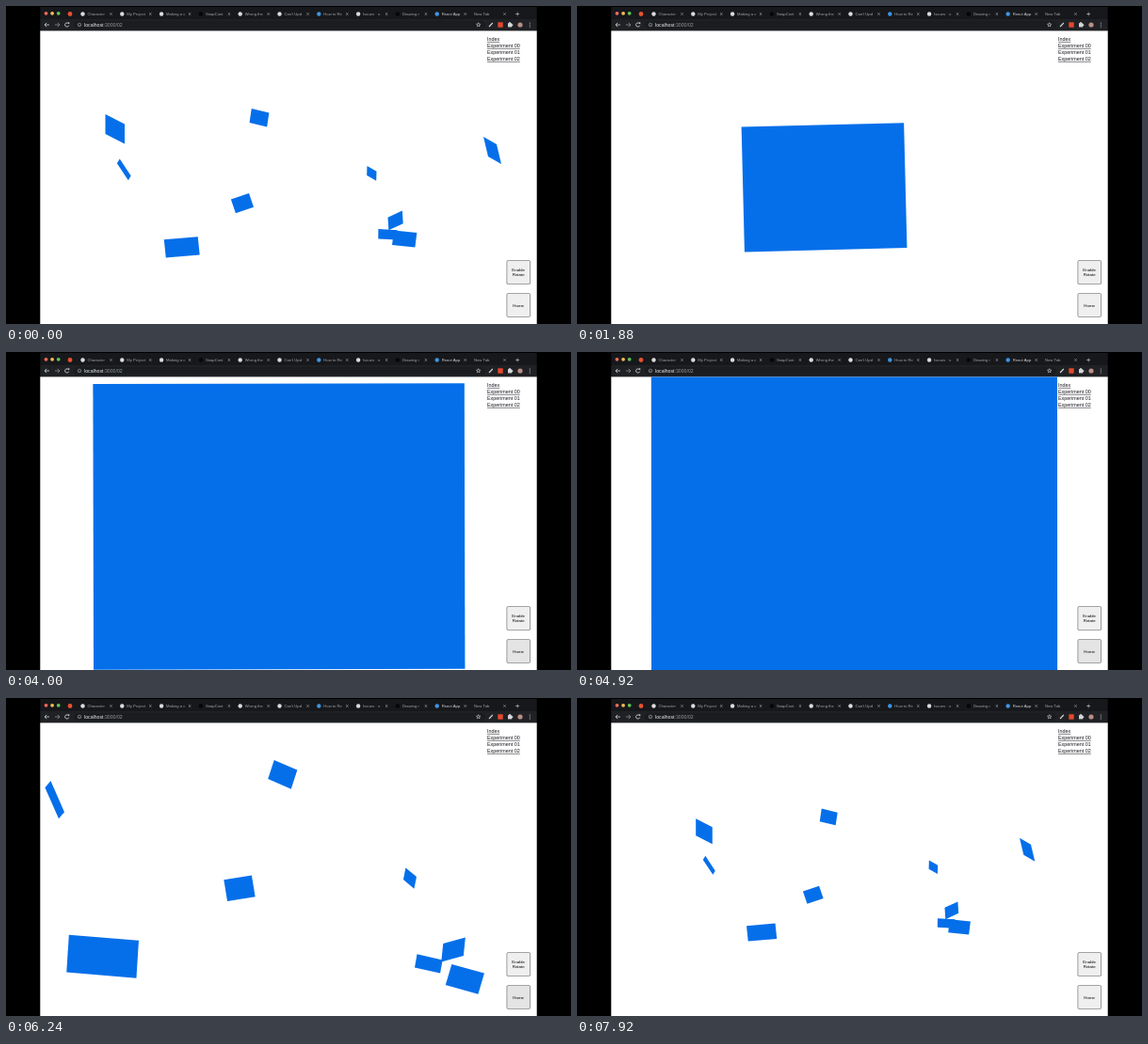
These frames come from a looping animation (600 by 338 pixels, 8000 ms). An HTML page with a canvas:

```html
<!DOCTYPE html>
<html lang="en">
<head>
<meta charset="utf-8">
<title>Experiment 02</title>
<style>
  html, body { margin: 0; width: 100%; height: 100%; overflow: hidden; background: #000; }
  canvas { display: block; width: 600px; height: 338px; }
</style>
</head>
<body>
<canvas id="stage"></canvas>
<script>
const W = 600, H = 338, LOOP = 8000, STEP = 40;
const VIEW = { x: 36.3, y: 26.4, w: 527.4, h: 311.6 };
const CX = 300, CY = 183.2;
const BLUE = '#056fea';
const FONT = '"Liberation Sans", Arial, sans-serif';

const canvas = document.getElementById('stage');
const ctx = canvas.getContext('2d');
const ratio = window.devicePixelRatio || 1;
canvas.width = W * ratio;
canvas.height = H * ratio;

// --- camera ---------------------------------------------------------------

const NEAR = 2.23, START = 49.5, HOME = 63.5;
const HOP_START = 1280, HOP = 280, RETURN = 5480;

// Smooth approach, then regular hops that each close 30% of the gap, then the way home
function distance(t) {
  if (t >= RETURN) return HOME - (HOME - 9.9) * Math.exp((RETURN - t) / 1320);
  const gap = (START - NEAR) * Math.exp(-Math.min(t, 1080) / 705);
  if (t < HOP_START) return NEAR + gap;
  const n = Math.floor((t - HOP_START) / HOP);
  const part = Math.min(1, ((t - HOP_START) % HOP + STEP) / (2 * STEP));
  return NEAR + gap * 0.704 ** (n + part);
}

// The camera turns evenly on the way in and lags at first on the way out
function makeCamera(d, leaving) {
  const far = d - NEAR;
  const roll = far * (leaving ? 0.215 + 0.0027 * far : 0.4) * Math.PI / 180;
  return { d, cos: Math.cos(roll), sin: Math.sin(roll), vx: -59.5 + 0.04 * d, vy: 14.5 - 0.095 * d };
}

function project(cam, p) {
  const depth = cam.d + p.z;
  const x = cam.vx + p.x / depth, y = cam.vy + p.y / depth;
  return [CX + x * cam.cos + y * cam.sin, CY - x * cam.sin + y * cam.cos];
}

function unproject(cam, sx, sy, z) {
  const x = sx - CX, y = sy - CY, depth = cam.d + z;
  return {
    x: (x * cam.cos - y * cam.sin - cam.vx) * depth,
    y: (x * cam.sin + y * cam.cos - cam.vy) * depth,
    z
  };
}

// --- cards ----------------------------------------------------------------

// Depth and three corners as seen by a camera; the fourth corner follows
function card(cam, z, ...c) {
  const [a, b, e] = [0, 2, 4].map(i => unproject(cam, c[i], c[i + 1], z));
  return [a, b, e, { x: a.x + e.x - b.x, y: a.y + e.y - b.y, z }];
}

const mid = makeCamera(33.5, true), far = makeCamera(START, false);
const cards = [
  [[-1, -1], [1, -1], [1, 1], [-1, 1]].map(([x, y]) => ({ x: 500 * x + 125, y: 385 * y - 30.5, z: 0 })),
  card(mid, -18.2, 68.5, 251.5, 142, 257.5, 139.5, 297),
  card(mid, -9.2, 48.5, 89, 63, 122, 57, 129),
  card(mid, 7.3, 284.5, 66.5, 309, 77, 302.5, 97),
  card(mid, 22.5, 424, 180.5, 435.5, 190, 433, 202.5),
  card(mid, 3, 463.5, 260.5, 487, 254, 485, 273.5),
  card(mid, 10.3, 436, 272, 463, 278, 460.5, 292),
  card(mid, 1.4, 472.5, 282.5, 507, 292, 500.5, 314),
  card(far, -16.5, 105.5, 115, 126, 125.5, 126, 146.5),
  card(far, -16.3, 507, 139, 521, 147, 526, 168)
];

function drawCards(cam) {
  ctx.fillStyle = BLUE;
  for (const pts of cards) {
    if (cam.d + pts[0].z < 1.2) continue;
    ctx.beginPath();
    for (const p of pts) ctx.lineTo(...project(cam, p));
    ctx.fill();
  }
}

// --- drawing helpers --------------------------------------------------------

function rect(x, y, w, h, color) {
  ctx.fillStyle = color;
  ctx.fillRect(x, y, w, h);
}

function pill(x, y, w, h, r, color) {
  ctx.fillStyle = color;
  ctx.beginPath();
  ctx.roundRect(x, y, w, h, r);
  ctx.fill();
}

function dot(x, y, r, color) {
  ctx.fillStyle = color;
  ctx.beginPath();
  ctx.arc(x, y, r, 0, 7);
  ctx.fill();
}

function arc(x, y, r, from, to, color, width) {
  ctx.strokeStyle = color;
  ctx.lineWidth = width;
  ctx.beginPath();
  ctx.arc(x, y, r, from, to);
  ctx.stroke();
}

function line(color, width, ...pts) {
  ctx.strokeStyle = color;
  ctx.lineWidth = width;
  ctx.beginPath();
  for (let i = 0; i < pts.length; i += 2) ctx.lineTo(pts[i], pts[i + 1]);
  ctx.stroke();
}

function text(str, x, y, size, color, align = 'left') {
  ctx.font = `${size}px ${FONT}`;
  ctx.fillStyle = color;
  ctx.textAlign = align;
  ctx.fillText(str, x, y);
  return ctx.measureText(str).width;
}

// --- browser frame ----------------------------------------------------------

const LIGHT = '#d5d7da';
const TABS = ['Character', 'My Project', 'Making a c', 'SnapCont', 'Wrong the', "Can't Upd",
  'How to Re', 'Issues · o', 'Drawing r', 'React App', 'New Tab'];
const ACTIVE = 9;

function iconColor(i) {
  if (i === 6 || i === ACTIVE) return '#3d95e4';
  return i === 3 || i === 8 ? '#060606' : '#dcdcdc';
}

function arrow(tip, dir, color) {
  line(color, 0.8, tip, 20, tip + 5 * dir, 20);
  line(color, 0.8, tip + 2.2 * dir, 17.8, tip, 20, tip + 2.2 * dir, 22.2);
}

function drawTabs() {
  ['#ec6a5e', '#f4bf4f', '#61c554'].forEach((c, i) => dot(42.5 + i * 6.6, 7.8, 1.9, c));
  dot(68, 8.5, 2.4, '#e8512f');
  TABS.forEach((name, i) => {
    const x = 81.5 + i * 41.8, last = i === TABS.length - 1;
    if (!last) dot(x, 8.5, 2.2, iconColor(i));
    text(name, x + (last ? -2.5 : 5), 10.2, 4.2, i === ACTIVE ? '#d4d6d9' : '#a2a5a9');
    for (const s of [-1.2, 1.2]) line('#b4b6ba', 0.6, x + 28.8, 8.5 - s, x + 31.2, 8.5 + s);
  });
  line(LIGHT, 0.6, 541.2, 8.5, 545.2, 8.5);
  line(LIGHT, 0.6, 543.2, 6.5, 543.2, 10.5);
}

function drawToolbar() {
  arrow(41, 1, LIGHT);
  arrow(57, -1, '#8b8d91');
  arc(64.7, 20, 2.1, 0.3, 5.5, LIGHT, 0.8);
  rect(65.8, 17.4, 1.5, 1.5, LIGHT);

  pill(72, 15.8, 437, 8.4, 4.2, '#1a1c1f');
  arc(78, 20, 1.8, 0, 7, '#a8abae', 0.6);
  rect(77.7, 19.6, 0.6, 1.4, '#a8abae');
  const w = text('localhost', 83, 21.8, 5.2, '#eceef0');
  text(':3000/02', 83 + w, 21.8, 5.2, '#96999d');

  ctx.strokeStyle = LIGHT;
  ctx.lineWidth = 0.6;
  ctx.beginPath();
  for (let i = 0; i < 10; i++) {
    const r = i % 2 ? 1 : 2.3, a = i * Math.PI / 5 - Math.PI / 2;
    ctx.lineTo(501.7 + r * Math.cos(a), 20 + r * Math.sin(a));
  }
  ctx.closePath();
  ctx.stroke();

  line(LIGHT, 1.1, 513, 22, 516.8, 18);
  rect(522.3, 17.3, 5.4, 5.4, '#e5482f');
  rect(533, 18.2, 4.2, 4.2, LIGHT);
  dot(535, 18, 1, LIGHT);
  dot(537.4, 20.3, 1, LIGHT);
  dot(546, 20, 2.6, '#b98f86');
  for (const y of [18, 20, 22]) dot(556.3, y, 0.55, LIGHT);
}

// --- page -------------------------------------------------------------------

function drawLinks() {
  ['Index', 'Experiment 00', 'Experiment 01', 'Experiment 02'].forEach((name, i) => {
    const y = 37.3 + i * 7;
    const w = text(name, 511, y, 5.4, '#1c1c24');
    if (i !== 2) rect(511, y + 0.6, w, 0.6, '#33333c');
  });
}

function button(y, lines, fill) {
  pill(531.5, y, 25.5, 25.5, 1.6, '#858585');
  pill(532.3, y + 0.8, 23.9, 23.9, 1, fill);
  lines.forEach((str, i) => {
    text(str, 544.2, y + 14.3 + (i - (lines.length - 1) / 2) * 5, 4.4, '#000', 'center');
  });
}

function draw(t) {
  ctx.setTransform(ratio, 0, 0, ratio, 0, 0);
  rect(0, 0, W, H, '#000');
  rect(VIEW.x, 1, VIEW.w, 13, '#16181b');
  rect(VIEW.x, 14, VIEW.w, 13, '#1f2124');
  drawTabs();
  drawToolbar();

  rect(VIEW.x, VIEW.y, VIEW.w, VIEW.h, '#fff');
  ctx.save();
  ctx.beginPath();
  ctx.rect(VIEW.x, VIEW.y, VIEW.w, VIEW.h);
  ctx.clip();
  drawCards(makeCamera(distance(t), t >= RETURN));
  ctx.restore();

  drawLinks();
  const hover = t >= 3160 && t < 7240;
  button(270.3, ['Enable', 'Rotate'], '#efefef');
  button(305.2, ['Home'], hover ? '#e4e4e4' : '#efefef');
}

const start = performance.now();
function tick() {
  const t = (performance.now() - start) % LOOP;
  draw(Math.floor(t / STEP) * STEP);
  requestAnimationFrame(tick);
}
tick();
</script>
</body>
</html>
```
